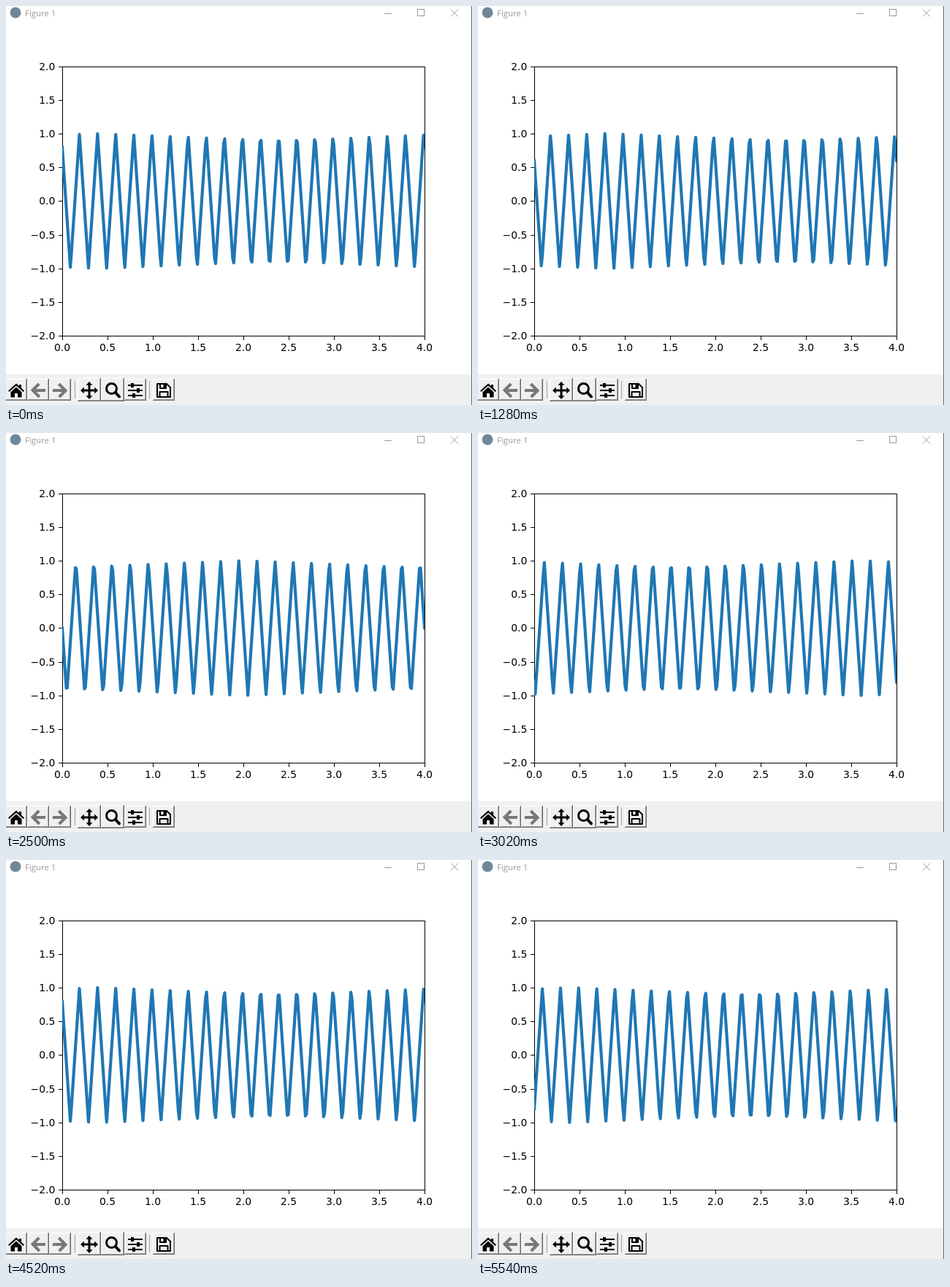
Recreate the animation shown at these times as an HTML page. Size 638 by 547 pixels, loop 5600 ms.

```html
<!DOCTYPE html>
<html lang="en">
<head>
<meta charset="utf-8">
<title>Figure 1</title>
<style>
  html, body { margin: 0; width: 100%; height: 100%; overflow: hidden; background: #fff; }
  svg { display: block; }
  .label { font: 13.89px "DejaVu Sans", sans-serif; }
  .title { font: 11.4px "Open Sans", "Noto Sans", sans-serif; fill: #999; }
  .crisp { shape-rendering: crispEdges; }
  .stroke { fill: none; stroke: #000; }
</style>
</head>
<body>
<svg width="638" height="547" viewBox="0 0 638 547">
  <defs>
    <clipPath id="plot"><rect x="77" y="83" width="496" height="369"/></clipPath>
    <pattern id="stipple" width="2" height="2" patternUnits="userSpaceOnUse">
      <path class="crisp" d="M0 0h1v1h-1zM1 1h1v1h-1z"/>
    </pattern>
  </defs>
  <rect width="638" height="547" fill="#fff"/>

  <!-- title bar -->
  <circle cx="13" cy="9" r="7.5" fill="#6f8798"/>
  <text class="title" x="26" y="14">Figure 1</text>
  <g fill="none" stroke="#999">
    <path class="crisp" d="M518 10.5h10M563.5 4.5h9v9h-9z"/>
    <path d="M609 4.5l10 10M619 4.5l-10 10"/>
  </g>

  <!-- axes -->
  <rect class="crisp stroke" x="77.5" y="83.5" width="496" height="369"/>
  <path id="ticks" class="crisp stroke"/>
  <g id="labels" class="label"></g>
  <polyline id="wave" clip-path="url(#plot)" fill="none" stroke="#1f77b4" stroke-width="4.17"
            stroke-linejoin="round" stroke-linecap="square"/>

  <!-- toolbar -->
  <rect y="505" width="638" height="42" fill="#f0f0f0"/>
  <rect x="637" width="1" height="547" fill="#6b6b6b"/>
  <g id="buttons" class="crisp"></g>
  <path class="crisp" d="M94.5 514v24M196.5 514v24" stroke="#a0a0a0"/>
  <path d="M14 517.5l4 3.6v-2.1h3v4.800l4 3.600-1.400 1.600-9.600-8.600-9.600 8.600-1.400-1.600zM14 522.500l7.500 6.700v7.300h-5.500v-5.500h-4v5.500h-5.500v-7.300z"/>
  <g fill="none" stroke="url(#stipple)" stroke-width="4">
    <path d="M45.500 518l-9 9 9 9M37 527h17"/>
    <path d="M72.500 518l9 9-9 9M81 527h-17"/>
  </g>
  <path d="M114 515l4.500 4.800h-3v5.700h5.700v-3l4.800 4.500-4.800 4.500v-3h-5.700v5.700h3l-4.500 4.800-4.500-4.800h3v-5.700h-5.700v3l-4.800-4.500 4.800-4.500v3h5.700v-5.700h-3z"/>
  <circle class="stroke" cx="144.500" cy="524.500" r="7" stroke-width="3"/>
  <path class="stroke" d="M150 530l5 5.500" stroke-width="4" stroke-linecap="round"/>
  <g class="crisp">
    <path class="stroke" d="M167 520h20M167 527h20M167 534h20" stroke-width="2"/>
    <path d="M171 517h4v6h-4zM179 524h4v6h-4zM173 531h4v6h-4z"/>
  </g>
  <path class="stroke" d="M207 518h13l5 5v13h-18zM211 518v6h8v-6M210.500 536v-7h11v7" stroke-width="2" stroke-linejoin="round"/>
  <path d="M215.500 518h3v5h-3z"/>
</svg>
<script>
const LOOP = 5600, SAMPLES = 360;
const LEFT = 77, TOP = 82.6, WIDTH = 496, HEIGHT = 369.6;
const $ = id => document.getElementById(id);
const toX = x => LEFT + x / 4 * WIDTH;
const toY = y => TOP + (2 - y) / 4 * HEIGHT;

function buildAxes() {
  let ticks = '', labels = '';
  const label = (x, y, anchor, value) =>
    labels += `<text x="${x}" y="${y}" text-anchor="${anchor}">${value.toFixed(1).replace('-', '\u2212')}</text>`;
  for (let i = 0; i <= 8; i++) {
    const x = Math.round(toX(i / 2)), y = Math.round(toY(2 - i / 2));
    ticks += `M${x + .5} 453v5M72 ${y + .5}h5`;
    label(x, 473, 'middle', i / 2);
    label(67.3, y + 5, 'end', 2 - i / 2);
  }
  $('ticks').setAttribute('d', ticks);
  $('labels').innerHTML = labels;
}

function buildButtons() {
  const button = (x, y, w, h) => `
    <rect x="${x}" y="${y}" width="${w}" height="${h}" fill="#696969"/>
    <rect x="${x}" y="${y}" width="${w - 1}" height="${h - 1}" fill="#fff"/>
    <rect x="${x + 1}" y="${y + 1}" width="${w - 2}" height="${h - 2}" fill="#a0a0a0"/>
    <rect x="${x + 1}" y="${y + 1}" width="${w - 3}" height="${h - 3}" fill="#f0f0f0"/>`;
  $('buttons').innerHTML =
    [-1, 29, 59, 162, 201].map(x => button(x, 511, 30, 30)).join('') +
    [98, 130].map(x => button(x, 510, 32, 32)).join('');
}

// Redraws come in runs of nine, on a 20 ms clock; each advances two steps, a late one three.
const runs = [[70, 600], [660, 1200], [1280, 1820], [1880, 2420], [2500, 3020],
              [3120, 3640], [3720, 4260], [4320, 4860], [4920, 5460]];
const redraws = runs.flatMap(([start, end]) => Array.from({ length: 9 }, (_, j) =>
  j ? Math.round((start + (end - start) * j / 8) / 20) * 20 : start)).concat(5540);
const late = [1280, 2500, 3120, 3720, 3860, 4200];
const passed = (times, t) => times.filter(at => at <= t).length;

function drawWave(step) {
  const points = Array.from({ length: SAMPLES }, (_, k) => {
    const x = 4 * k / (SAMPLES - 1);
    const y = Math.asin(Math.sin(10 * Math.PI * (x + .06 - .01 * step))) * 2 / Math.PI;
    return toX(x).toFixed(2) + ',' + toY(y).toFixed(2);
  });
  $('wave').setAttribute('points', points.join(' '));
}

let shown = -1;
const startTime = performance.now();
function tick() {
  const t = (performance.now() - startTime) % LOOP;
  const step = 2 * passed(redraws, t) + passed(late, t);
  if (step !== shown) drawWave(shown = step);
  requestAnimationFrame(tick);
}

buildAxes();
buildButtons();
tick();
</script>
</body>
</html>
```
